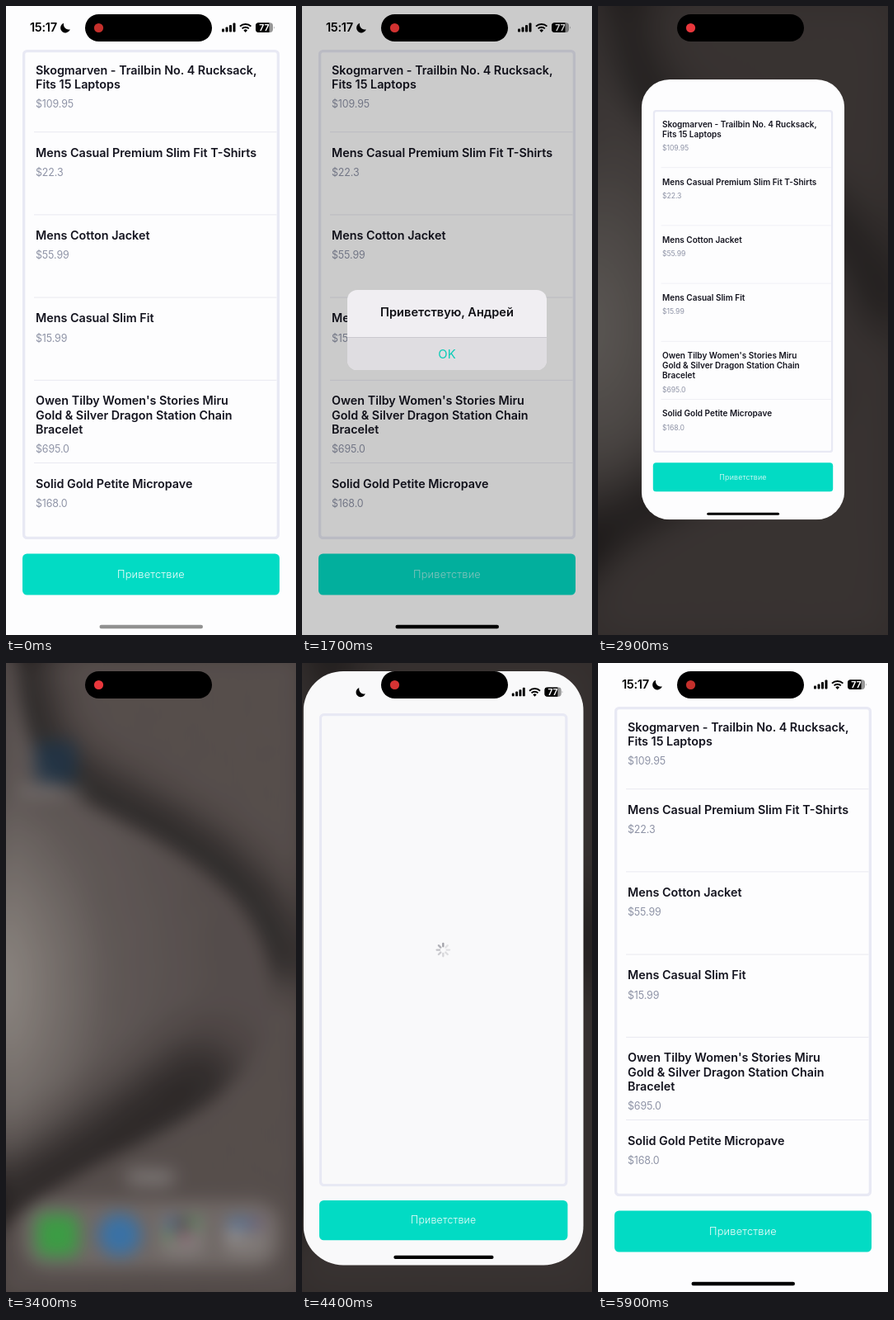
Recreate the animation shown at these times as an HTML page. Size 352 px wide and 762 px high, loop 6300 ms.

```html
<!DOCTYPE html>
<html lang="ru">
<head>
<meta charset="utf-8">
<title>Shop list</title>
<style>
  html, body { margin: 0; width: 100%; height: 100%; overflow: hidden; background: #332c2b; }
  svg { display: block; width: 352px; height: 762px; font-family: Inter, Roboto, sans-serif; }
  .title { font-size: 14.33px; font-weight: 600; fill: #14141f; }
  .price { font-size: 12.4px; letter-spacing: -.1px; fill: #8e93a6; }
  .mid { text-anchor: middle; }
</style>
</head>
<body>
<svg viewBox="0 0 352 762">
  <defs>
    <filter id="soft" x="-50%" y="-50%" width="200%" height="200%"><feGaussianBlur stdDeviation="20"/></filter>
    <filter id="softer" x="-50%" y="-80%" width="200%" height="260%"><feGaussianBlur stdDeviation="28"/></filter>
    <filter id="grain" x="0" y="0" width="100%" height="100%" color-interpolation-filters="sRGB">
      <feTurbulence type="fractalNoise" baseFrequency=".75" numOctaves="2" seed="4"/>
      <feColorMatrix values="0 0 0 0 1  0 0 0 0 .96  0 0 0 0 .93  1 0 0 0 0"/>
      <feComponentTransfer><feFuncA type="table" tableValues="0 0 0 .02 .05 .09 .16 .35 .7 1 1"/></feComponentTransfer>
    </filter>
    <radialGradient id="glow" gradientUnits="userSpaceOnUse" cx="0" cy="0" r="300" gradientTransform="translate(-40 390) scale(1 1.45)">
      <stop offset="0" stop-color="#b0aaa4"/><stop offset=".25" stop-color="#908883"/>
      <stop offset=".55" stop-color="#69605e"/><stop offset="1" stop-color="#5a504f"/>
    </radialGradient>
    <path id="bulge" d="M12-90C12 40 15 120 90 165C190 222 322 270 322 400C322 500 235 545 160 583C100 612 40 640-10 690L-90 740V-90Z"/>
    <clipPath id="inBulge"><use href="#bulge"/></clipPath>
    <clipPath id="card"><rect id="cardBox" width="352" height="762"/></clipPath>
    <clipPath id="alertBox"><rect x="55" y="344" width="242" height="97" rx="12"/></clipPath>
    <text id="clock" x="29" y="31.3" font-size="14.6" font-weight="600" letter-spacing="-.3" fill="currentColor">15:17</text>
    <g id="status" fill="currentColor">
      <path d="M70 20.8a6 6 0 1 0 7.8 7.6a6.5 6.5 0 0 1-7.8-7.6z"/>
      <rect x="262" y="27.5" width="3" height="4" rx="1"/><rect x="266.5" y="25.5" width="3" height="6" rx="1"/>
      <rect x="271" y="23" width="3" height="8.5" rx="1"/><rect x="275.5" y="20.5" width="3" height="11" rx="1"/>
      <g fill="none" stroke="currentColor" stroke-width="2">
        <path d="M284 24.6a9.6 9.6 0 0 1 13.4 0M286.6 27.4a5.8 5.8 0 0 1 8.2 0"/>
      </g>
      <path d="M290.7 32l-2.3-2.6a3.4 3.4 0 0 1 4.6 0z"/>
      <rect x="303" y="20.3" width="21" height="11.6" rx="3.6" opacity=".4"/>
      <path d="M306.6 20.3H319.5V31.9H306.6a3.6 3.6 0 0 1-3.6-3.6V23.9a3.6 3.6 0 0 1 3.6-3.6z"/>
      <path d="M325 24.4q1.6 1.7 0 3.4z" opacity=".4"/>
      <text x="313.5" y="30" font-size="10.4" font-weight="700" class="mid" style="fill:var(--hole)">77</text>
    </g>
  </defs>

  <g id="home">
    <g>
      <rect x="-90" y="-90" width="532" height="942" fill="#5c5250"/>
      <path d="M18-60C20 40 30 110 100 152C200 205 328 260 338 385" fill="none" stroke="#272120" stroke-width="60" filter="url(#soft)"/>
      <use href="#bulge" fill="url(#glow)"/>
      <g clip-path="url(#inBulge)">
        <path d="M-70 700C40 640 130 590 235 505" fill="none" stroke="#241e1d" stroke-width="92" stroke-linecap="round" filter="url(#softer)"/>
      </g>
      <rect width="352" height="762" filter="url(#grain)" opacity=".6"/>
    </g>
    <g id="icons"></g>
  </g>
  <rect id="shade" width="352" height="762"/>
  <g id="homeStatus" style="color:#dedbda;--hole:#4a4342"><use href="#clock"/><use href="#status"/></g>

  <g id="app">
    <g clip-path="url(#card)">
      <rect id="page" width="352" height="762"/>
      <rect x="21.6" y="54.6" width="308.8" height="589.8" rx="4" fill="none" stroke="#e8e9f4" stroke-width="3.3"/>
      <g id="list"></g>
      <g id="spinner" fill="#85858d"></g>
      <rect x="20" y="663.5" width="312" height="50" rx="5.5" fill="#02dbc4"/>
      <text id="hello" x="176" y="693" font-size="12.8" font-weight="300" letter-spacing=".2" fill="#fff" class="mid">Приветствие</text>
      <g style="color:#000;--hole:#fff"><use id="appClock" href="#clock"/><use id="appStatus" href="#status"/></g>
      <rect id="dim" width="352" height="762"/>
      <rect id="bar" x="113.5" width="125.5" height="4.4" rx="2.2"/>
      <rect id="cover" width="352" height="762" fill="#24405a"/>
    </g>
  </g>

  <g id="alert">
    <g clip-path="url(#alertBox)">
      <rect x="55" y="344" width="242" height="97" fill="#f0eef2"/>
      <rect id="ok" x="55" y="401" width="242" height="40"/>
      <rect x="55" y="401" width="242" height=".7" fill="#c3c2c7"/>
    </g>
    <text x="176" y="376" font-size="14.6" font-weight="600" fill="#111116" class="mid">Приветствую, Андрей</text>
    <text x="176" y="427" font-size="14.8" fill="#0accb7" class="mid">OK</text>
  </g>

  <rect x="96" y="10" width="154" height="33" rx="16.5"/>
  <circle id="dot" cx="112.5" cy="26.5" r="5.6"/>
</svg>
<script>
const LOOP = 6300, STEP = 100;
const $ = id => document.getElementById(id);
const clamp = v => Math.min(1, Math.max(0, v));
const mix = (a, b, k) => a + (b - a) * k;
const span = (t, a, b) => clamp((t - a) / (b - a));
const smooth = (t, a, b) => { const u = span(t, a, b); return u * u * (3 - 2 * u); };
const easeOut = (t, a, b) => 1 - (1 - span(t, a, b)) ** 3;
const set = (id, attrs) => { for (const k in attrs) $(id).setAttribute(k, attrs[k]); };
const box = (x, y, size, r, fill) =>
  `<rect x="${x}" y="${y}" width="${size}" height="${size}" rx="${r}" fill="${fill}"/>`;

const goods = [
  ["$109.95", "Skogmarven - Trailbin No. 4 Rucksack,", "Fits 15 Laptops"],
  ["$22.3", "Mens Casual Premium Slim Fit T-Shirts"],
  ["$55.99", "Mens Cotton Jacket"],
  ["$15.99", "Mens Casual Slim Fit"],
  ["$695.0", "Owen Tilby Women's Stories Miru", "Gold &amp; Silver Dragon Station Chain", "Bracelet"],
  ["$168.0", "Solid Gold Petite Micropave"]
];
$("list").innerHTML = goods.map(([price, ...lines], i) => {
  const y = 82.6 + i * 100.2;
  return lines.map((s, n) => `<text class="title" x="36" y="${y + n * 17.1}">${s}</text>`).join("") +
    `<text class="price" x="36" y="${y + lines.length * 17.1 + 6.2}">${price}</text>` +
    (i < 5 ? `<rect x="34" y="${y + 69.6}" width="294.5" height="1" fill="#e9e9f1"/>` : "");
}).join("");

const folder = (x, colors) => box(x, 681, 54, 12, "#ffffff40") +
  colors.map((c, i) => box(x + 6.5 + i % 3 * 14.6, 687 + (i / 3 | 0) * 14.6, 11.6, 2.8, c)).join("");
$("icons").innerHTML = box(28, 81, 54, 12, "#24405a") +
  `<text x="54.5" y="149" font-size="10.4" letter-spacing="-.45" fill="#fff" class="mid">MockWorkForNEL...</text>
  <rect x="142" y="621" width="67.5" height="27" rx="13.5" fill="#ffffff38"/>
  <g fill="none" stroke="#fff" stroke-width="1.5"><circle cx="156.5" cy="633.5" r="2.9"/><path d="M158.7 635.7l3 3"/></g>
  <text x="182" y="638.2" font-size="10.6" font-weight="600" letter-spacing="-.1" fill="#fff" class="mid">Поиск</text>
  <rect x="12" y="664" width="329" height="87" rx="33" fill="#cfc8c466"/>` +
  box(30, 681, 54, 12, "#3fdc50") + `<circle cx="136" cy="707.5" r="27" fill="#3b98ec"/>` +
  folder(189, ["#2477ea", "#141414", "#35cc55", "#48d65a", "#d93a8c"]) +
  folder(269, ["#2f7fe6", "#3a86dc", "#6a4f9c", "#f4f4f4"]);

$("spinner").innerHTML = [...Array(8).keys()].map(i =>
  `<rect x="174.4" y="340.3" width="2.4" height="6" rx="1.2" transform="rotate(${i * 45} 175.6 349.5)"/>`).join("");

function drawApp(t) {
  const opening = t >= 4100, p = easeOut(t, 4100, 4556);
  const q = smooth(t, 2200, 2670);
  let x, y, scale, height = 762, radius = 0;
  if (opening) {
    scale = mix(54, 352, p) / 352;
    x = 28 * (1 - p ** 1.5);
    y = 81 * (1 - p ** 3.2);
    height = (mix(135, 762, p ** 1.3) - y) / scale;
    if (p < 1) radius = mix(78, 49, p);
  } else {
    scale = 1 - .3 * q;
    x = 176 * (1 - scale) + 3.7 * Math.sin(Math.PI * q);
    y = 110 * q ** 1.45 - 760 * span(t, 2850, 3150) ** 2;
    if (q) radius = 49;
  }
  const loading = t >= 4100 && t < 4800;
  set("app", {
    transform: `translate(${x} ${y}) scale(${scale})`,
    visibility: t < 3150 || opening ? "visible" : "hidden"
  });
  set("cardBox", { height, rx: radius });
  set("page", { fill: loading ? "#f9f9fa" : "#fdfdfe" });
  set("list", { opacity: loading ? 0 : 1 });
  set("spinner", { opacity: loading ? 1 : 0 });
  const turn = Math.floor(t / 125);
  [...$("spinner").children].forEach((el, i) =>
    el.setAttribute("opacity", .2 + .55 * ((i - turn + 802) % 8 / 7) ** 2));
  set("appStatus", { opacity: opening ? span(p, .6, .95) : 1 - q });
  set("appClock", { opacity: opening ? span(t, 4400, 4700) : 1 - q });
  const grey = mix(145, 0, span(t, 300, 700));
  set("bar", { y: height - 12.2, fill: `rgb(${grey} ${grey} ${grey})` });
  set("cover", { opacity: opening ? 1 - span(p, .1, .55) : 0 });
}

function drawHome(t) {
  const hidden = t < 4000 ? 1 - smooth(t, 3000, 3800) : smooth(t, 4050, 4400);
  $("home").style.filter = hidden ? `blur(${20 * hidden}px)` : "none";
  const s = 1 - .09 * hidden;
  set("icons", {
    opacity: 1 - hidden * hidden,
    transform: `translate(${176 * (1 - s)} ${381 * (1 - s)}) scale(${s})`
  });
  set("shade", { opacity: .46 * hidden ** 1.4 });
  set("homeStatus", { opacity: clamp(1 - 2 * hidden) });
}

function drawAlert(t) {
  const arrival = easeOut(t, 250, 750);
  const shown = arrival * (1 - smooth(t, 1700, 2100));
  const s = 1.15 - .15 * arrival;
  set("alert", {
    opacity: shown,
    transform: `translate(${176 * (1 - s)} ${392.5 * (1 - s)}) scale(${s})`
  });
  set("dim", { opacity: .2 * shown });
  set("ok", { fill: t >= 1600 ? "#dfdde1" : "#f0eef2" });
  set("hello", { opacity: .95 - .3 * shown });
}

function frame() {
  const now = performance.now() % LOOP;
  const t = Math.floor((now + 2) / STEP) * STEP % LOOP;
  drawHome(t);
  drawApp(t);
  drawAlert(t);
  const k = (.5 - .5 * Math.cos(2 * Math.PI * t / LOOP)) ** 2;
  set("dot", { fill: `rgb(${mix(197, 234, k)} ${mix(48, 55, k)} ${mix(44, 60, k)})` });
  requestAnimationFrame(frame);
}
frame();
</script>
</body>
</html>
```
